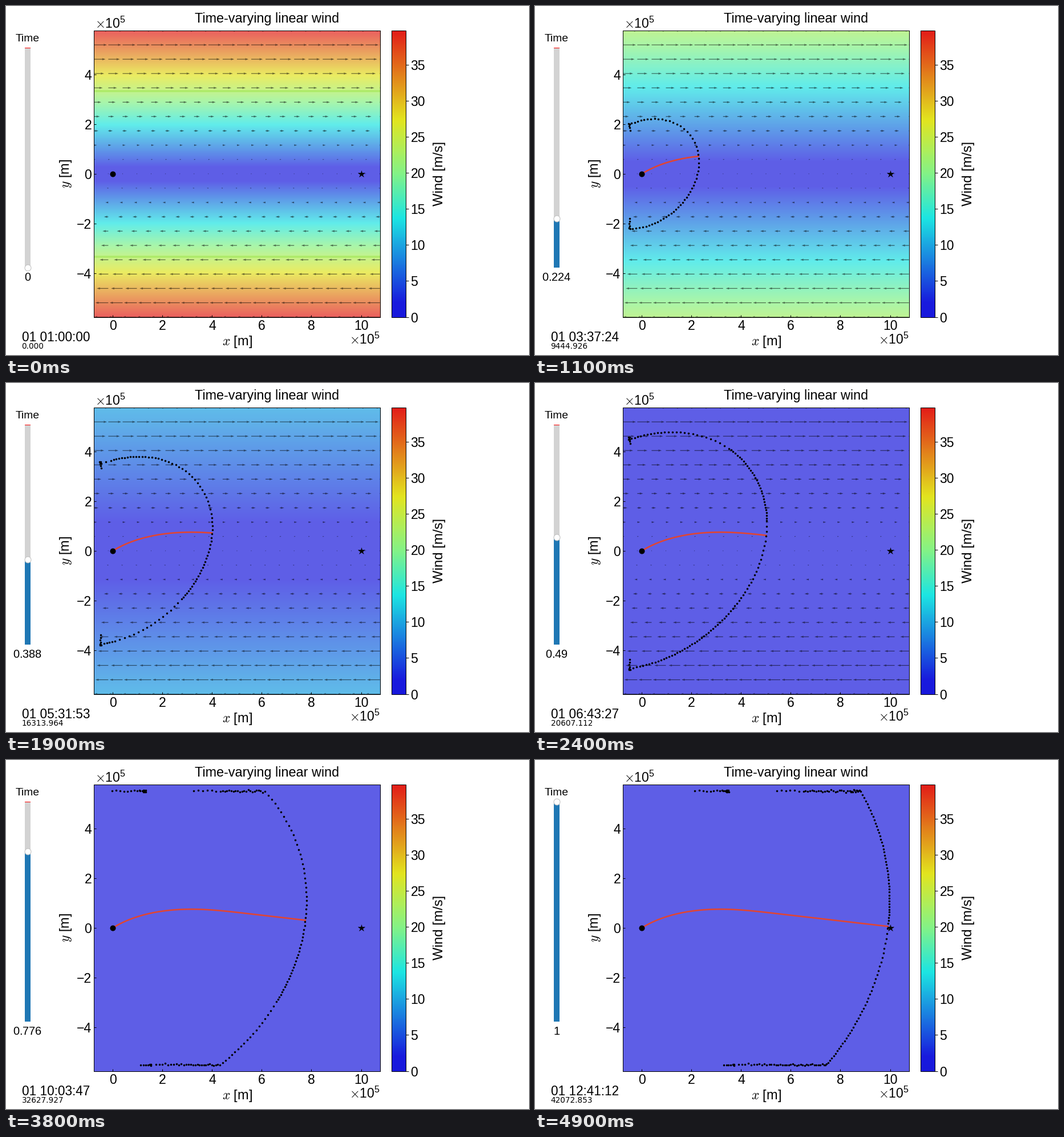
Write a matplotlib script that moves like this. It is 917 by 611 pixels and loops after 5 s.

```python
import numpy as np
import matplotlib.pyplot as plt
from matplotlib.animation import FuncAnimation
from matplotlib.cm import ScalarMappable
from matplotlib.colors import LinearSegmentedColormap, Normalize
from matplotlib.widgets import Slider

WIDTH, HEIGHT, DPI = 917, 611, 72   # at 72 dpi one point is one pixel
FRAMES, INTERVAL = 50, 100
DURATION = 42072.85349              # simulated seconds in one loop
STEP = DURATION / (FRAMES - 1)
FADE = 6 * 3600                     # the wind dies out after this time

# Lengths are in units of 1e5 m
SPEED, SHEAR = 23e-5, 6.9e-5
LEFT, CEILING, HALF = -0.5, 5.5, 5.76
TARGET, AIM = (10, 0), (10, 0.05)
BASE_RAYS, LEVELS, MAX_GAP = 24, 8, 0.215
SUBSTEPS, LEAD = 20, 4              # the front runs slightly ahead of the clock

plt.rcParams.update({
    "font.family": "Liberation Sans",
    "font.size": 23,
    "mathtext.fontset": "cm",
    "axes.linewidth": 1,
})


def strength(t):
    return max(0.0, 1 - t / FADE)


def simulate():
    """Fly a fan of time-optimal paths; those that hit a wall slide along it."""
    n = BASE_RAYS * 2 ** LEVELS
    angle = 2 * np.pi * np.arange(n) / n
    heading = np.array([np.cos(angle), np.sin(angle)])
    pos, slide = np.zeros((2, n)), np.zeros((2, n))
    free = np.ones(n, bool)
    dt = STEP / SUBSTEPS
    paths, slides = [], []
    for k in range((FRAMES - 1) * SUBSTEPS + LEAD):
        shear = SHEAR * strength((k + 0.5) * dt)
        heading[1] -= shear * heading[0] * dt
        flight = SPEED * heading / np.hypot(*heading)
        drift = np.array([shear * pos[1], np.zeros(n)])
        pos += np.where(free, flight + drift, slide) * dt

        past_left, past_end = pos[0] < LEFT, np.abs(pos[1]) > CEILING
        turn = ~free & ((past_left & (slide[0] < 0)) |
                        (past_end & (slide[1] != 0)))
        slide[:, turn] = [[SPEED], [0]]
        hit_end = free & past_end
        slide[0, hit_end] = SPEED * np.sign(flight[0, hit_end])
        hit_left = free & past_left & ~past_end
        slide[1, hit_left] = SPEED * np.sign(flight[1, hit_left])
        free &= ~(past_left | past_end)
        if (k + 1 - LEAD) % SUBSTEPS == 0:
            paths.append(pos.copy())
            slides.append(slide.copy())
    return np.array(paths), np.array(slides)


def birth_frames(paths, free):
    """A ray joins the front once its two neighbours have drifted apart."""
    n = paths.shape[2]
    birth = np.full(n, FRAMES)
    step = n // BASE_RAYS
    birth[::step] = 0
    frames = np.arange(FRAMES)[:, None]
    while step > 1:
        a = np.arange(0, n, step)
        b = (a + step) % n
        gap = np.hypot(*np.moveaxis(paths[:, :, a] - paths[:, :, b], 1, 0))
        wide = (gap > MAX_GAP) & free[:, a] & free[:, b]
        wide &= frames >= np.maximum(birth[a], birth[b])
        birth[a + step // 2] = np.where(wide.any(0), wide.argmax(0), FRAMES)
        step //= 2
    return birth


paths, slides = simulate()
birth = birth_frames(paths, ~slides.any(axis=1))
best = np.hypot(paths[-1, 0] - AIM[0], paths[-1, 1] - AIM[1]).argmin()
route = np.vstack([[0, 0], paths[:, :, best]])
jitter = np.random.default_rng(4).normal(0, 0.024, paths.shape[2])
dots = paths + jitter * slides[:, ::-1] / SPEED

fig = plt.figure(figsize=((WIDTH + 1e-6) / DPI, (HEIGHT + 1e-6) / DPI),
                 dpi=DPI, facecolor="white")


def add_axes(left, top, right, bottom):
    return fig.add_axes([left / WIDTH, 1 - bottom / HEIGHT,
                         (right - left) / WIDTH, (bottom - top) / HEIGHT])


def add_text(x, y, text, size, ha="center", **kwargs):
    return fig.text(x / WIDTH, 1 - y / HEIGHT, text, fontsize=size, ha=ha,
                    va="baseline", **kwargs)


stops = [(0, (24, 24, 220)), (0.05, (24, 26, 221)), (0.345, (28, 229, 226)),
         (0.5, (130, 242, 135)), (0.58, (172, 238, 92)),
         (0.69, (226, 228, 30)), (1, (226, 28, 24))]
cmap = LinearSegmentedColormap.from_list(
    "wind", [(p, np.array(c) / 255) for p, c in stops], N=512)
norm = Normalize(0, SHEAR * 1e5 * HALF)

# Wind map
ax = add_axes(154.3, 43, 655.6, 544.6)
extent = (5 - HALF, 5 + HALF, -HALF, HALF)
rows = np.linspace(-HALF, HALF, 240)
full_wind = SHEAR * 1e5 * np.abs(rows)[:, None]
field = ax.imshow(full_wind, extent=extent, origin="lower", aspect="auto",
                  cmap=cmap, norm=norm, alpha=0.7, interpolation="bilinear")
limits = [ax.axhline(0, color=(0.55, 0.88, 0.2), alpha=0.4, lw=3.5)
          for _ in range(2)]
gx, gy = np.meshgrid(np.linspace(*extent[:2], 21), np.linspace(-HALF, HALF, 21))
arrows = ax.quiver(gx, gy, gy, 0 * gy, color="black", alpha=0.55,
                   width=0.0024, zorder=2)
route_line, = ax.plot([], [], color=(0.88, 0.27, 0.2), lw=2.6, zorder=3)
front, = ax.plot([], [], "o", color="black", ms=3.5, mew=0, zorder=4)
ax.plot(0, 0, "o", color="black", ms=10, mew=0, zorder=5)
ax.plot(*TARGET, "*", color="black", ms=12, mew=0.5, zorder=5)
ax.set(xlim=extent[:2], ylim=extent[2:],
       xticks=range(0, 11, 2), yticks=range(-4, 5, 2))
ax.tick_params(direction="in", length=4, width=1, pad=4)

# Colour scale
scale = fig.colorbar(ScalarMappable(norm, cmap),
                     cax=add_axes(676, 43, 701.4, 544.6), ticks=range(0, 36, 5))
scale.ax.tick_params(length=4.5, width=1, pad=3.5)

# Labels
add_text(458, 29, "Time-varying linear wind", 23.4)
add_text(405.5, 594, "$x$ [m]", 23.5)
upright = dict(rotation=90, rotation_mode="anchor")
add_text(110.5, 293.5, "$y$ [m]", 23.5, **upright)
add_text(766, 293.5, "Wind [m/s]", 24, **upright)
power = r"$\times\mathregular{10^5}$"
add_text(156, 39, power, 23, ha="left")
add_text(656, 592, power, 23, ha="right")
clock = add_text(27.5, 587, "", 22.5, ha="left")
seconds = add_text(27.5, 600, "", 13.6, ha="left", family="DejaVu Sans")

# Time slider
slider = Slider(add_axes(28, 73.5, 48, 458.5), "Time", 0, 1, valinit=1,
                orientation="vertical", handle_style={"size": 11})
slider.drawon = False
slider.label.set_fontsize(19.2)
slider.valtext.set_fontsize(20)


def update(i):
    t = i * STEP
    wind = strength(t)
    field.set_data(full_wind * wind)
    arrows.set_visible(wind > 0)
    reach = SPEED / SHEAR / max(wind, 1e-6)
    for line, y in zip(limits, (reach, -reach)):
        line.set_ydata([y, y])
    route_line.set_data(*route[:i + 2].T)
    front.set_data(*dots[i][:, birth <= i])
    slider.set_val(i / (FRAMES - 1))
    minutes, sec = divmod(int(t) + 3600, 60)
    clock.set_text(f"01 {minutes // 60:02d}:{minutes % 60:02d}:{sec:02d}")
    seconds.set_text(f"{t:.3f}")
    return []


animation = FuncAnimation(fig, update, frames=FRAMES, interval=INTERVAL,
                          repeat=True, repeat_delay=0)
plt.show()
```
